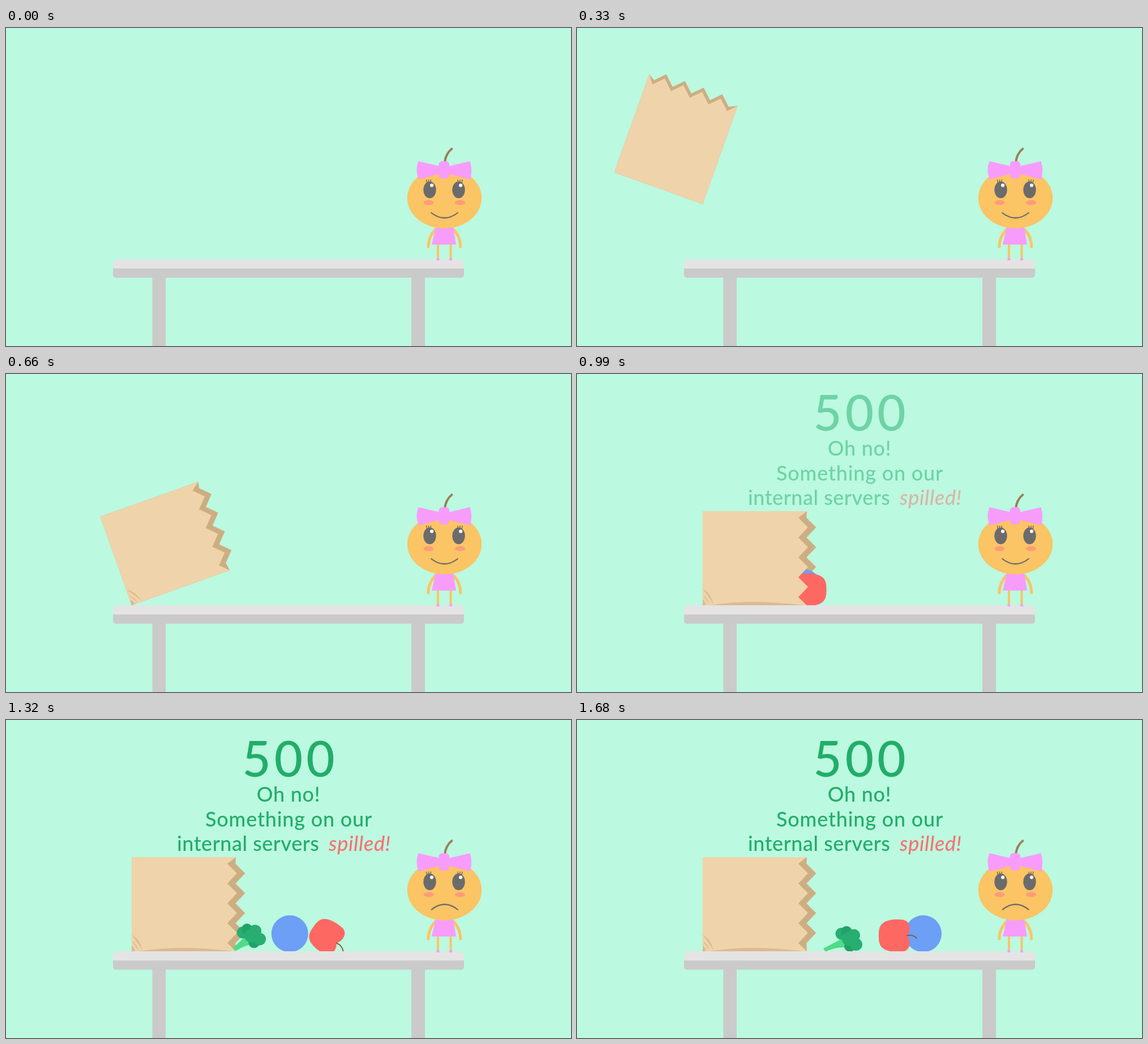
Animation, 998 px wide and 561 px high, one loop 2.25 s. Source, as an HTML page with a canvas:

```html
<!DOCTYPE html>
<html lang="en">
<head>
<meta charset="utf-8">
<title>500</title>
<style>
  html, body { margin: 0; width: 100%; height: 100%; overflow: hidden; background: #bbf9e0; }
  canvas { display: block; }
</style>
</head>
<body>
<canvas id="stage" width="998" height="561"></canvas>
<script>
const ctx = document.getElementById('stage').getContext('2d');
const LOOP = 2250, STEP = 30, FLOOR = 408;
const C = {
  bg: '#bbf9e0', top: '#e4e4e4', table: '#cacaca', bag: '#efd3aa', inside: '#cdae82', fold: '#dcba8f',
  skin: '#fbc464', pink: '#f89cfc', gray: '#6b6b6b', cheek: '#fb9c7b', twig: '#988159',
  apple: '#fe6862', stem: '#7d5a3c', berry: '#6c9ff5', leaf: '#27ae70', leafDark: '#21a268',
  stalk: '#4fdc88', text: '#22ad69', spill: '#f97272'
};

const clamp = (x, a = 0, b = 1) => Math.min(b, Math.max(a, x));

// Linear interpolation through [time, value] stops.
function track(t, stops) {
  let [t0, v0] = stops[0];
  for (const [t1, v1] of stops) {
    if (t <= t1) return t1 === t0 ? v1 : v0 + (v1 - v0) * clamp((t - t0) / (t1 - t0));
    [t0, v0] = [t1, v1];
  }
  return v0;
}

function fill(path, color) {
  ctx.fillStyle = color;
  ctx.fill(new Path2D(path));
}

function stroke(path, color, width, cap = 'butt') {
  ctx.strokeStyle = color;
  ctx.lineWidth = width;
  ctx.lineCap = cap;
  ctx.stroke(new Path2D(path));
}

function oval(x, y, rx, ry, color) {
  ctx.fillStyle = color;
  ctx.beginPath();
  ctx.ellipse(x, y, rx, ry, 0, 0, Math.PI * 2);
  ctx.fill();
}

function box(x, y, w, h, color, radii = 0) {
  ctx.fillStyle = color;
  ctx.beginPath();
  ctx.roundRect(x, y, w, h, radii);
  ctx.fill();
}

function placed(x, y, degrees, draw) {
  ctx.save();
  ctx.translate(x, y);
  ctx.rotate(degrees * Math.PI / 180);
  draw();
  ctx.restore();
}

// Bag space: the origin is the bottom right corner it tips over on.
const BAG_W = 166, BAG_H = 184;

function bagOutline(lift) {
  let path = `M0 0H${-BAG_W}V${-BAG_H}`;
  for (let i = 0; i < 5; i++) {
    const u = 11.5 + 35 * i - BAG_W;
    path += `L${u} ${-169 - lift}`;
    if (i < 4) path += `L${u + 17} ${-186 - lift}`;
  }
  return path + `L0 ${-BAG_H}Z`;
}

function bagPose(t) {
  return {
    y: track(t, [[56, 126], [474.5, FLOOR]]),
    angle: track(t, [[56, 0], [474.5, 30], [750, 90]])
  };
}

function bagBack({ y, angle }) {
  placed(222, y, angle, () => fill(bagOutline(6.3 + 0.09 * angle), C.inside));
}

function bagFront({ y, angle }, t) {
  placed(222, y, angle, () => {
    fill(bagOutline(0), C.bag);
    if (t >= 475) {
      fill('M-29 0Q-22 -14 -1 -19Q-18 -10 -29 0Z', C.fold);
      fill('M-18 0Q-13 -9 -1 -12Q-11 -6 -18 0Z', C.fold);
      fill('M-10 0Q-7 -5 0 -6V0Z', C.fold);
    }
    if (t >= 750) fill('M0 -13Q-12 -85 0 -178Z', C.fold);
  });
}

function broccoli(t) {
  const left = clamp(1680 - t, 0, 800);
  placed(481 - left * 0.13, 387 - left / 60, -left / 24, () => {
    fill('M-46 16Q-28 7 -14 -1L-4 14Q-26 13 -42 22Z', C.stalk);
    oval(-14, -10, 10.5, 10.5, C.leaf);
    oval(-5, -14, 9.5, 9.5, C.leafDark);
    oval(8, -7, 11, 11, C.leaf);
    oval(1, 12, 10, 10, C.leafDark);
    oval(12, 9, 11, 11, C.leaf);
    oval(-1, -1, 12, 12, C.leaf);
  });
}

function berry(t) {
  oval(track(t, [[870, 363.5], [1680, 611.5]]), 377, 32.5, 32.5, C.berry);
}

function apple(t) {
  const x = track(t, [[870, 359], [990, 413.5], [1320, 565], [1340, 573], [1680, 560]]);
  const angle = track(t, [[870, -168], [990, -90], [1320, 125], [1340, 138], [1680, 90]]);
  placed(x, 380.5, angle, () => {
    fill('M0 -23C7 -29 24 -31 28 -17C30 -2 28 13 22 20C16 27 8 27 0 27' +
         'C-8 27 -16 27 -22 20C-28 13 -30 -2 -28 -17C-24 -31 -7 -29 0 -23Z', C.apple);
    stroke('M0 -22Q-3 -33 5 -41', C.stem, 1.7);
  });
}

function table() {
  box(258.5, 438, 23.5, 123, C.table);
  box(716, 438, 24, 123, C.table);
  box(189, 422, 620, 18.5, C.table, [0, 0, 5, 5]);
  box(189, FLOOR, 620, 16.3, C.top, [8, 8, 0, 0]);
}

function girl(sad) {
  stroke('M758 356Q746 369 745.8 386', C.skin, 5, 'round');
  stroke('M791 356Q803 369 802.8 386', C.skin, 5, 'round');
  for (const x of [763, 785.5]) {
    box(x - 2, 380, 4, 27, C.skin);
    box(x - 2.5, 405.5, 5, 4.5, C.pink, [2, 2, 0, 0]);
  }
  fill('M759 351H790L795 382H752Z', C.pink);
  oval(774.5, 300, 65.7, 53.5, C.skin);
  stroke('M775 238Q776 222 788.5 212', C.twig, 4);
  fill('M728.5 235L767 244V257L729 267Q722 251 728.5 235Z', C.pink);
  fill('M819.5 235L781 244V257L820 267Q824.5 251 819.5 235Z', C.pink);
  box(764.5, 235, 18.5, 30.5, C.pink, 6);
  for (const [x, lash] of [[748.5, 746.5], [799.5, 802]]) {
    for (const k of [-1, 0, 1]) {
      stroke(`M${lash + k * 3} 274L${lash + k * 4} 267.5`, C.gray, 1.5);
    }
    oval(x, 285.5, 11.2, 14.7, C.gray);
    oval(x + 3.6, 277.5, 3.1, 3.1, '#fff');
  }
  oval(746.5, 308, 9, 4.3, C.cheek);
  oval(802, 308, 9, 4.3, C.cheek);
  stroke(sad ? 'M751 335Q774.5 315.5 798.5 335' : 'M750.5 325.5Q774.5 344.5 798.5 325.5', C.gray, 2.2);
}

function write(text, x, y, size, spacing, color, align = 'center', style = '') {
  ctx.font = `${style} 500 ${size}px Lato, "Open Sans", sans-serif`;
  ctx.letterSpacing = spacing + 'px';
  ctx.textAlign = align;
  ctx.fillStyle = color;
  ctx.fillText(text, x, y);
}

function message(alpha) {
  ctx.globalAlpha = alpha;
  write('500', 502, 100, 87, 6, C.text);
  write('Oh no!', 499, 143.5, 36, 0.7, C.text);
  write('Something on our', 499.5, 187.5, 36, 0.8, C.text);
  write('internal servers', 302, 231, 36, 0.5, C.text, 'left');
  write('spilled!', 570, 231, 36, 0.7, C.spill, 'left', 'italic');
  ctx.globalAlpha = 1;
}

function draw(t) {
  box(0, 0, 998, 561, C.bg);
  if (t >= 885) message(clamp((t - 875) / 230));
  if (t >= 120) {
    const pose = bagPose(t);
    bagBack(pose);
    if (t >= 870) {
      broccoli(t);
      berry(t);
      apple(t);
    }
    bagFront(pose, t);
  }
  table();
  girl(t >= 1125);
}

const start = performance.now();
function tick() {
  const t = (performance.now() - start) % LOOP;
  draw(Math.floor(t / STEP) * STEP);
  requestAnimationFrame(tick);
}
tick();
</script>
</body>
</html>
```
